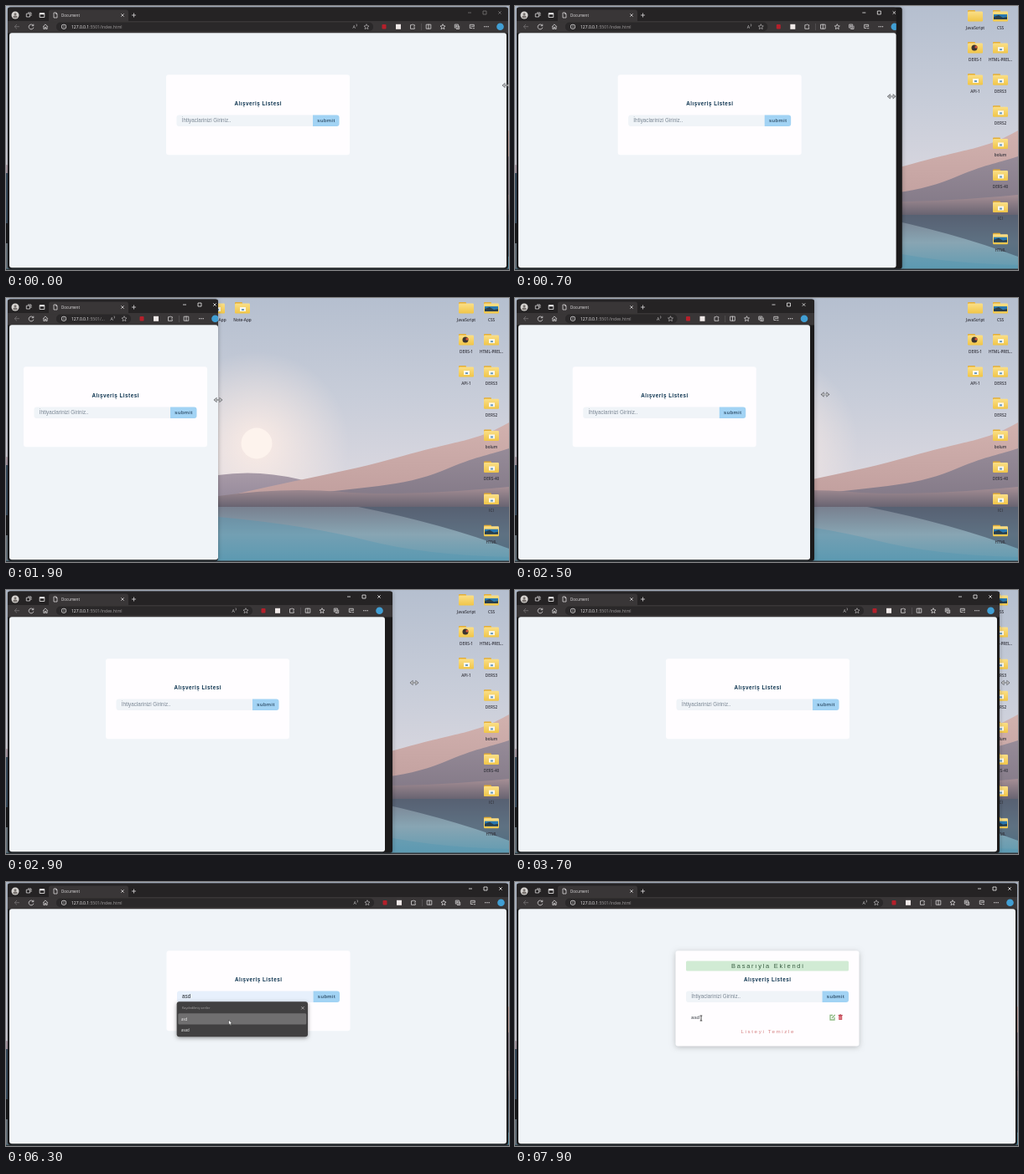
Recreate the animation shown at these times as an HTML page with a canvas. Size 600 by 316 pixels, loop 8000 ms.

```html
<!DOCTYPE html>
<html lang="tr">
<head>
<meta charset="utf-8">
<title>Alışveriş Listesi</title>
<style>
  html, body { margin: 0; width: 100%; height: 100%; overflow: hidden; background: #c3cad7; }
  canvas { display: block; width: 600px; height: 316px; }
</style>
</head>
<body>
<canvas id="stage"></canvas>
<script>
const LOOP = 8000, STEP = 100;
const PAGE_FONT = '"Liberation Sans", Arial, sans-serif';
const UI_FONT = '"Open Sans", "Noto Sans", sans-serif';
const canvas = document.getElementById('stage');
const ratio = window.devicePixelRatio || 1;
canvas.width = 600 * ratio;
canvas.height = 316 * ratio;
const c = canvas.getContext('2d');

// time, pointer x, pointer y
const pointerKeys = [
  [0, 597, 95], [200, 597, 95], [1100, 331, 119], [1500, 278, 121], [1900, 253, 122],
  [2100, 253, 120], [2900, 487, 111], [3700, 585, 111], [4200, 597, 108], [4700, 597, 108],
  [5300, 390, 172], [5500, 345, 139], [5700, 330, 139], [6100, 267, 164], [6300, 265.5, 165],
  [6500, 266, 165], [6900, 384, 138], [7300, 388, 138], [7900, 222, 163]
];
// time, window edge, layout edge, painted edge
const windowKeys = [
  [0, 599, 598, 597], [200, 599, 598, 597], [1100, 352, 352, 341], [1500, 287, 290, 280],
  [1900, 253, 258, 253], [2100, 253, 253, 252], [2900, 461, 454, 452],
  [3700, 578, 576, 575], [4200, 599, 599, 597]
];

function sample(keys, t) {
  const next = keys.findIndex(k => k[0] > t);
  if (next < 0) return keys[keys.length - 1].slice(1);
  const a = keys[next - 1], b = keys[next];
  const p = (t - a[0]) / (b[0] - a[0]);
  return a.slice(1).map((v, i) => v + (b[i + 1] - v) * p);
}

function rect(x, y, w, h, color) {
  c.fillStyle = color;
  c.fillRect(x, y, w, h);
}

function box(x, y, w, h, r, color) {
  c.fillStyle = color;
  c.beginPath();
  c.roundRect(x, y, w, h, r);
  c.fill();
}

function disc(x, y, r, color) {
  c.fillStyle = color;
  c.beginPath();
  c.arc(x, y, r, 0, Math.PI * 2);
  c.fill();
}

function stroke(path, x, y, color = '#d8d6d7', width = 0.8) {
  c.save();
  c.translate(x, y);
  c.strokeStyle = color;
  c.lineWidth = width;
  c.stroke(new Path2D(path));
  c.restore();
}

function text(str, x, y, size, color, { font = PAGE_FONT, weight = 400, align = 'left', spacing = 0 } = {}) {
  c.font = `${weight} ${size}px ${font}`;
  c.letterSpacing = spacing + 'px';
  c.textAlign = align;
  c.textBaseline = 'alphabetic';
  c.fillStyle = color;
  c.fillText(str, x, y);
  return c.measureText(str).width;
}

function gradient(y0, y1, ...colors) {
  const g = c.createLinearGradient(0, y0, 0, y1);
  colors.forEach((color, i) => g.addColorStop(i / (colors.length - 1), color));
  return g;
}

function shape(path, fill) {
  c.fillStyle = fill;
  c.fill(new Path2D(path));
}

function folder(x, y, label, badge) {
  box(x - 9, y - 7, 9, 5, 1, '#e3ad35');
  box(x - 9, y - 5.5, 18, 12, 1.2, gradient(y - 6, y + 7, '#fbe08a', '#f0c445'));
  if (badge === 'picture') {
    rect(x - 8, y - 2, 16, 6, '#2878b0');
    shape(`M${x - 8} ${y + 1} l6 -2 l5 3 l5 -1 v3 h-16z`, '#283e4c');
  } else if (badge === 'paper') {
    rect(x - 3, y - 1, 7, 5, '#f8f7ee');
    rect(x - 1, y + 1, 3, 2, '#6b9cc0');
  } else if (badge === 'disc') {
    disc(x - 1, y, 3.5, '#3c3431');
    disc(x + 1, y - 1, 1.6, '#d45a3c');
  }
  text(label, x, y + 15.5, 4.7, '#34343d', { font: UI_FONT, align: 'center', weight: 600 });
}

function desktop() {
  rect(0, 0, 600, 316, gradient(0, 240, '#b5bfcf', '#c8cdd9', '#dedae1'));
  const glow = c.createRadialGradient(299, 174, 12, 299, 174, 110);
  glow.addColorStop(0, 'rgba(255,238,230,.8)');
  glow.addColorStop(1, 'rgba(255,238,230,0)');
  rect(180, 60, 240, 200, glow);
  disc(299, 174, 18.5, '#fdf3ed');

  shape('M0 190 Q160 222 253 212 Q300 205 350 217 L440 240 H0z', gradient(190, 245, '#b2a3ae', '#94899a'));
  shape('M253 240 C340 218 400 210 470 190 S560 172 600 149 V252 H253z', gradient(150, 250, '#d1b1ae', '#bf9d9c'));
  shape('M353 236 C420 226 475 226 520 207 S570 190 600 180 V252 H353z', gradient(180, 250, '#968b98', '#817785'));
  shape('M253 237 Q330 226 400 232 T600 226 V253 H253z', gradient(226, 252, '#a68f95', '#63606e'));
  rect(0, 250, 600, 66, gradient(250, 316, '#78808f', '#88a5b3', '#619bb1'));
  shape('M420 250 H600 V300 Q520 270 420 250z', 'rgba(61,72,91,.55)');
  shape('M253 262 Q360 272 430 290 T600 310 V316 H253z', 'rgba(83,151,177,.4)');
  rect(0, 200, 2, 60, '#3b5064');
  rect(0, 260, 2, 24, '#18191d');
  rect(0, 284, 2, 30, '#6c7882');

  folder(252, 12, 'Liste-App', 'paper');
  folder(282, 12, 'Note-App', 'paper');
  folder(549, 12, 'JavaScript');
  folder(549, 50, 'DERS-1', 'disc');
  folder(549, 88, 'API-1', 'paper');
  ['CSS', 'HTML-PREL..', 'DERS3', 'DERS2', 'bolum', 'DERS-40', 'ICI', 'HTML'].forEach((label, i) =>
    folder(579, 12 + i * 38.1, label, i % 7 ? 'paper' : 'picture'));
  rect(0, 314.5, 600, 1.5, '#33363b');
}

const ICONS = {
  reload: 'M2.6 -1.2 A2.9 2.9 0 1 0 2.9 1 M2.8 -3 V-1 H.8',
  home: 'M-2.8 0 L0 -2.8 L2.8 0 M-2.1 -.5 V2.8 H-.7 V.7 H.7 V2.8 H2.1 V-.5',
  star: 'M0 -3 L.9 -.9 L3 -.7 L1.4 .8 L1.9 2.9 L0 1.8 L-1.9 2.9 L-1.4 .8 L-3 -.7 L-.9 -.9z',
  puzzle: 'M-2.5 -2 H-.8 A1 1 0 0 1 1.1 -2 H2.3 V-.6 A1 1 0 0 0 2.3 1.2 V2.6 H-2.5z',
  split: 'M-2.8 -2.5 H2.8 V2.5 H-2.8z M0 -3 V3',
  layers: 'M-2.7 -2.6 H1.4 V1.4 H-2.7z M2.7 -1 V2.8 H-1 M-.7 -1.9 V.7 M-2 -.6 H.7',
  health: 'M-2.7 -2.4 H2.3 V.2 M-2.7 -2.4 V1.8 H0 M-1.5 -.4 H2 M.7 2 H3',
  cross: 'M-1.7 -1.7 L1.7 1.7 M1.7 -1.7 L-1.7 1.7',
  square: 'M-2 -2 H2 V2 H-2z'
};

function chrome(edge, layout, dim) {
  const ui = { font: UI_FONT };
  rect(2, 1.5, edge - 2, 17, '#252324');
  rect(2, 18, edge - 2, 14.5, '#393637');
  box(51, 4.5, 95, 15, [3, 3, 0, 0], '#393637');

  disc(11, 11, 4.5, '#d7d4d1');
  disc(11, 9.7, 1.5, '#77716e');
  box(8.4, 11.6, 5.2, 2.6, [2, 2, 1, 1], '#77716e');
  stroke('M-2.7 -1.8 H1.5 V2 H-2.7z M-1 -3 H3 V1', 27, 11);
  stroke('M-2.8 -2.3 H2.8 V2.5 H-2.8z', 43, 11, '#f3f1f2');
  rect(40.2, 8.4, 5.6, 1.8, '#f3f1f2');
  stroke('M-2 -3 H.7 L2 -1.7 V3 H-2z M.7 -3 V-1.5 H2', 59, 11);
  text('Document', 66, 12.8, 4.5, '#e4e2e3', ui);
  stroke(ICONS.cross, 139, 11);
  stroke('M-2.5 0 H2.5 M0 -2.5 V2.5', 152.5, 11);

  const control = dim ? '#777475' : '#eeeced';
  stroke('M-2 0 H2', layout - 45, 8, control);
  stroke(ICONS.square, layout - 27, 8, control);
  stroke(ICONS.cross, layout - 9, 8, control);

  stroke('M3 0 H-2.8 M0 -2.7 L-2.8 0 L0 2.7', 13, 24.7, '#777475');
  stroke(ICONS.reload, 30, 24.7);
  stroke(ICONS.home, 47, 24.7);

  const compact = layout < 300;
  const shift = compact ? 51 : 0;
  const at = offset => layout - offset + shift;
  const pillEnd = at(160);
  box(60, 19.5, pillEnd - 60, 10.8, 5, '#2a2829');
  disc(69, 24.7, 3, '#d8d6d7');
  disc(69, 24.7, 2.3, '#2a2829');
  rect(68.7, 24.2, 0.7, 2, '#d8d6d7');
  rect(68.7, 22.9, 0.7, 0.7, '#d8d6d7');
  const host = text('127.0.0.1', 78, 26.5, 5, '#f2f0f1', ui);
  text(compact ? ':5501/...' : ':5501/index.html', 78 + host, 26.5, 5, '#a09d9e', ui);
  text('A', at(184.5), 26.6, 5.3, '#c9c7c8', ui);
  stroke('M0 -1.5 Q1 0 0 1.5', at(180), 23, '#c9c7c8', 0.6);
  stroke(ICONS.star, at(168), 24.7, '#c9c7c8', 0.6);
  box(at(149.5), 22, 5, 5.5, 1, '#b5202b');
  rect(at(133), 21.8, 6, 6, '#f0e9e8');
  stroke(ICONS.puzzle, at(113), 24.7);
  rect(at(103), 21, 0.6, 8, '#615e5f');
  stroke(ICONS.split, at(94), 24.7);
  if (!compact) {
    stroke(ICONS.star, layout - 77, 24.7);
    stroke(ICONS.layers, layout - 60, 24.7);
    stroke(ICONS.health, layout - 42, 24.7);
  }
  for (let i = -1; i <= 1; i++) disc(layout - 25 + i * 2.2, 24.7, 0.65, '#e4e2e3');
  disc(layout - 8.5, 24.7, 4.3, '#419fd4');
}

function trash(x, y) {
  rect(x - 2, y - 2, 4, 5, '#cf5360');
  rect(x - 2.6, y - 3, 5.2, 0.9, '#b63c4b');
  rect(x - 0.9, y - 3.6, 1.8, 0.7, '#b63c4b');
  rect(x - 0.8, y - 1, 0.5, 3, '#f0b5ba');
  rect(x + 0.5, y - 1, 0.5, 3, '#f0b5ba');
}

function card(layout, t) {
  const mid = (layout + 3) / 2;
  const added = t >= 7100;
  const filled = t >= 6100 && !added;
  const hoverButton = t >= 6800 && t < 7500;

  c.save();
  if (t >= 6500) {
    c.shadowColor = 'rgba(0,0,0,.22)';
    c.shadowBlur = 6 * ratio;
    c.shadowOffsetY = 1.5 * ratio;
  }
  box(mid - 109.5, 82.3, 219, added ? 114.2 : 96, 3, '#fffdff');
  c.restore();

  if (added) {
    box(mid - 97, 94.5, 194, 12, 1.5, '#d1ebd4');
    text('Basarıyla Eklendi', mid + 0.8, 103.1, 7.5, '#3a5e43', { align: 'center', spacing: 1.75 });
    text('asd', mid - 91, 163.6, 6.25, '#3c4148');
    stroke('M2 0 V3 H-3 V-2.5 H0 M-1 1 L2.7 -3', mid + 78, 162, '#8dba83', 1.3);
    trash(mid + 87.2, 162);
    text('Listeyi Temizle', mid + 0.8, 181.3, 6.25, '#d68485', { align: 'center', spacing: 1.6 });
  }
  text('Alışveriş Listesi', mid + 0.2, 119.3, 6.3, '#0b324e', { align: 'center', weight: 700, spacing: 0.5 });

  box(mid - 97, 130.5, 162.5, 13.5, [3, 0, 0, 3], filled ? '#e7f0fc' : '#f0f4f8');
  box(mid + 65.5, 130.5, 31.5, 13.5, [0, 3, 3, 0], hoverButton ? '#49a6e9' : '#a2d3f4');
  text('submit', mid + 81.5, 139.3, 6.25, hoverButton ? '#ffffff' : '#102a42', { align: 'center', spacing: 0.5 });
  if (filled) text('asd', mid - 91, 139.4, 6.4, '#24282e');
  else text('İhtiyaclarinizi Giriniz..', mid - 90.8, 139.3, 6.28, '#7b8794');
  if (t >= 5500 && t < 6100) rect(mid - 91, 133.5, 0.5, 7, '#222222');
}

function suggestions(t) {
  const ui = { font: UI_FONT };
  c.save();
  c.shadowColor = 'rgba(0,0,0,.4)';
  c.shadowBlur = 5 * ratio;
  c.shadowOffsetY = 1.5 * ratio;
  box(203.7, 143.3, 156.3, 42, 3, '#414041');
  c.restore();
  text('Kaydedilmiş veriler', 210, 152.4, 3.8, '#aaa8a9', ui);
  stroke(ICONS.cross, 354, 150.8, '#d8d6d7', 0.6);
  if (t >= 6100) box(205.3, 157.3, 153, 13.3, 1.5, '#706f70');
  text('asd', 209, 165.7, 4.4, '#f4f4f4', ui);
  text('asad', 209, 179.2, 4.4, '#f4f4f4', ui);
}

function pointer(x, y, t) {
  if (t < 4800) {
    const arrows = 'M-2.2 0 H2.2 M-2.4 -1.4 L-4 0 L-2.4 1.4z M2.4 -1.4 L4 0 L2.4 1.4z';
    stroke(arrows, x, y, '#55575c', 1.7);
    stroke(arrows, x, y, '#f6f6f6', 0.6);
  } else if ((t >= 5500 && t < 5800) || t >= 7800) {
    stroke('M-1.3 -3 H1.3 M0 -3 V3 M-1.3 3 H1.3', x, y, '#222222', 0.8);
  } else {
    c.save();
    c.translate(x, y);
    const arrow = 'M0 0 V6 L1.4 4.7 L2.4 6.8 L3.4 6.3 L2.5 4.4 H4.3z';
    shape(arrow, '#ffffff');
    c.restore();
    stroke(arrow, x, y, '#222222', 0.5);
  }
}

function draw(now) {
  const t = Math.floor((now % LOOP) / STEP) * STEP;
  const [edge, layout, painted] = sample(windowKeys, t);
  c.setTransform(ratio, 0, 0, ratio, 0, 0);
  desktop();

  c.save();
  c.shadowColor = 'rgba(0,0,0,.3)';
  c.shadowBlur = 5 * ratio;
  box(2, 1.5, edge - 2, 313.2, 3, '#1b1a1b');
  c.restore();

  c.save();
  c.beginPath();
  c.roundRect(2, 1.5, (t < 2100 && t >= 300 ? painted : edge) - 2, 313.2, 3);
  c.clip();
  chrome(edge, layout, t < 300);
  c.restore();

  c.save();
  c.beginPath();
  c.roundRect(4, 32.3, painted - 4, 281, 3);
  c.clip();
  rect(4, 32, painted - 4, 282, '#f0f4f8');
  card(layout, t);
  c.restore();

  if (t >= 5700 && t < 6500) suggestions(t);
  pointer(...sample(pointerKeys, t), t);
}

let start;
function tick(now) {
  start ??= now;
  draw(now - start);
  requestAnimationFrame(tick);
}
requestAnimationFrame(tick);
</script>
</body>
</html>
```
